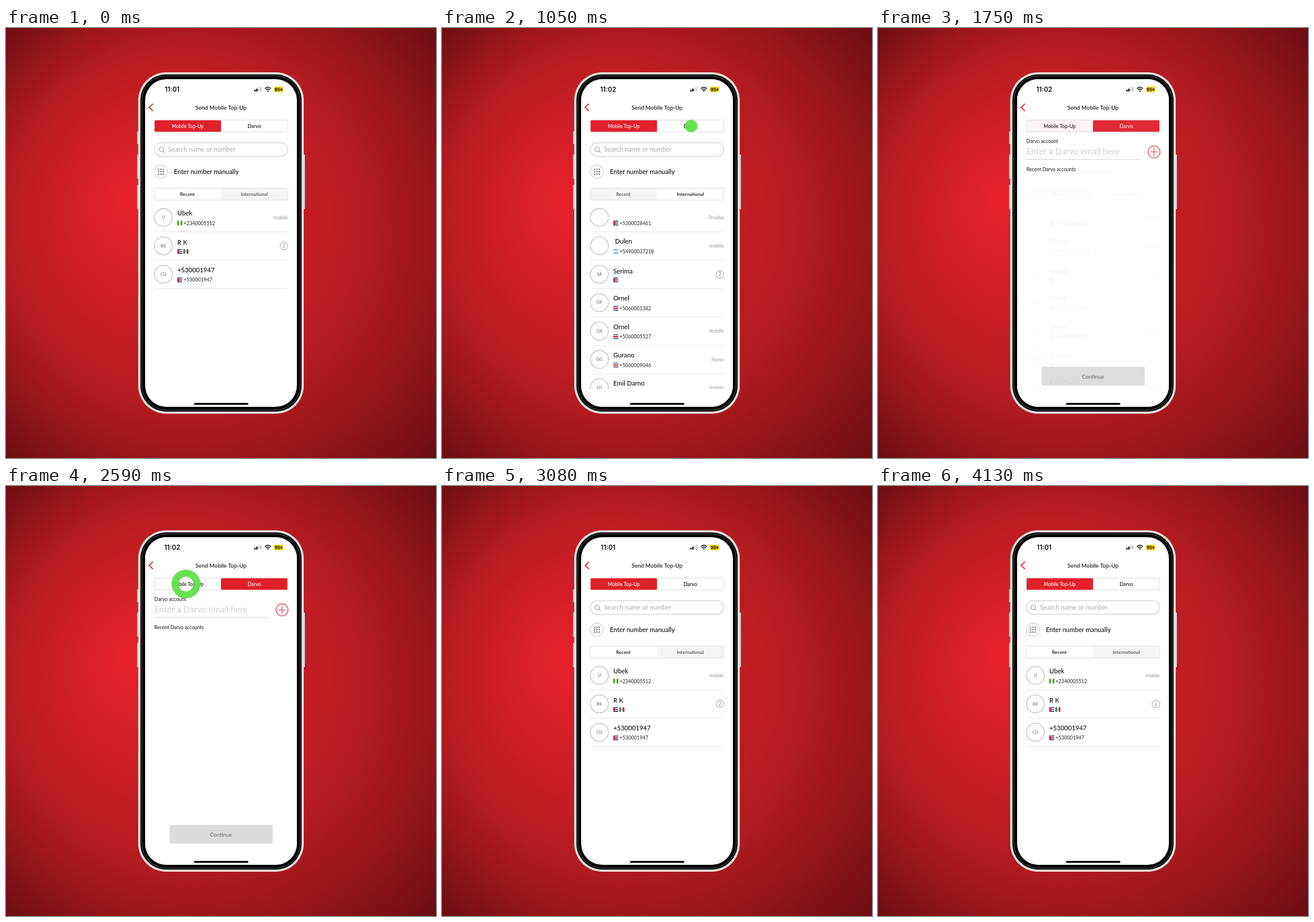
Animation, 748 px wide and 748 px high, one loop 4200 ms. Source, as an HTML page:

```html
<!DOCTYPE html>
<html lang="en">
<head>
<meta charset="utf-8">
<title>Mobile top-up</title>
<style>
html, body { margin: 0; width: 100%; height: 100%; overflow: hidden; background: #8f161c; }
svg { display: block; width: 100vw; height: 100vh; }
text { font-family: Lato, "Open Sans", sans-serif; }
.status { font-family: Inter, Roboto, sans-serif; }
</style>
</head>
<body>
<svg id="stage" viewBox="0 0 748 748"></svg>
<script>
const LOOP = 4200, RED = '#e0202a', GREEN = '#5fe04a', NAVY = '#1f2a6b';

// SVG helpers
const rect = (x, y, w, h, fill, r = 0, extra = '') =>
  `<rect x="${x}" y="${y}" width="${w}" height="${h}" rx="${r}" fill="${fill}" ${extra}/>`;
const box = (x, y, w, h, fill, r, line, width = 1) =>
  rect(x, y, w, h, fill, r, `stroke="${line}" stroke-width="${width}"`);
const ring = (x, y, r, line, width) =>
  `<circle cx="${x}" cy="${y}" r="${r}" fill="none" stroke="${line}" stroke-width="${width}"/>`;
const path = (d, line, width) =>
  `<path d="${d}" fill="none" stroke="${line}" stroke-width="${width}" stroke-linecap="round"/>`;
const label = (s, x, y, size, fill = '#111', anchor = 'start', weight = 400, cls = '') =>
  `<text x="${x}" y="${y}" font-size="${size}" fill="${fill}" text-anchor="${anchor}" font-weight="${weight}" class="${cls}">${s}</text>`;

const stripes = (colors, x, y, upright) => {
  const w = 8.6, h = 8, n = colors.length;
  return colors.map((c, i) => upright
    ? rect(x + i * w / n, y, w / n, h, c)
    : rect(x, y + i * h / n, w, h / n, c)).join('');
};
const flags = {
  ng: (x, y) => stripes(['#2f9e0c', '#fff', '#2f9e0c'], x, y, true),
  mx: (x, y) => stripes(['#14713f', '#fff', '#cf2030'], x, y, true) +
    `<circle cx="${x + 4.3}" cy="${y + 4}" r="1" fill="#8a6a3a"/>`,
  cu: (x, y) => stripes([NAVY, '#fff', NAVY, '#fff', NAVY], x, y) +
    `<path d="M${x} ${y}l5 4l-5 4z" fill="#d8202f"/>`,
  ar: (x, y) => stripes(['#7fbcd0', '#fff', '#7fbcd0'], x, y),
  cr: (x, y) => stripes([NAVY, '#fff', '#d8202f', '#d8202f', '#fff', NAVY], x, y)
};

function row(i, { initials = '', name = '', phone = '', codes, note = '', dx = 0 }) {
  const y = 329.6 + i * 49.4;
  const flagRow = codes.map((c, k) => flags[c](298 + k * 10.6, y + 5.8)).join('');
  const side = note === '2'
    ? ring(483.5, y, 6.6, '#999', 1) + label('2', 483.5, y + 3, 8.6, '#888', 'middle')
    : label(note, 490, y + 3, 8.5, '#999', 'end');
  return ring(273.8, y, 15.6, '#c2c2c2', 1.3) +
    label(initials, 273.8, y + 2.6, 7.2, '#888', 'middle', 700) +
    label(name, 298 + dx, y - (phone ? 3.6 : 1.8), 11.2, '#111', 'start', 500) +
    flagRow + label(phone, 308.8, y + 13, 8.6, '#222') + side +
    rect(258, y + 24.4, 232, 1, '#e8e8e8');
}

function topTabs(second) {
  return box(258, 160.2, 232, 20.6, '#fff', 2, '#ddd') +
    rect(second ? 374 : 258.5, 160.4, 115.5, 20.2, RED, 1.5) +
    label('Mobile Top-Up', 316, 173.6, 8.5, second ? '#111' : '#fff', 'middle', 500) +
    label('Darvo', 432, 173.6, 8.8, second ? '#fff' : '#111', 'middle', 500);
}

function clock(time, x) {
  return label(time, x, 110.8, 11.3, '#111', 'start', 600, 'status');
}

const screen = () => rect(242, 89, 264, 570, '#fff', 37);

function contactsScreen(second, rows) {
  let dots = '';
  for (let i = 0; i < 9; i++)
    dots += `<circle cx="${265.3 + i % 3 * 4.2}" cy="${245.8 + (i / 3 | 0) * 4.2}" r="1.4" fill="#888"/>`;
  return screen() + clock(second ? '11:02' : '11:01', second ? 275.3 : 276.3) +
    topTabs(false) +
    box(258, 199.6, 232, 23.6, '#fff', 11.8, '#d0d0d0', 1.2) +
    ring(270, 211, 4, '#999', 1.1) + path('M273 214l2.6 2.6', '#999', 1.1) +
    label('Search name or number', 282, 215.3, 11.3, '#aaa') +
    ring(269.5, 250, 11.4, '#ccc', 1.1) + dots +
    label('Enter number manually', 292, 254, 11.1, '#111', 'start', 500) +
    box(258, 278.6, 232, 20.8, '#fff', 2, '#ddd') +
    rect(second ? 258.5 : 374, 279, 115.5, 20, '#f4f4f4') +
    label('Recent', 315.5, 291.9, 8.3, second ? '#333' : '#111', 'middle', second ? 400 : 600) +
    label('International', 432, 291.9, 8.3, second ? '#111' : '#333', 'middle', second ? 600 : 400) +
    `<g clip-path="url(#list)">${rows.map((r, i) => row(i, r)).join('')}</g>`;
}

function accountScreen() {
  return screen() + clock('11:02', 275.3) + topTabs(true) +
    label('Darvo account', 258, 200.4, 8.7) +
    label('Enter a Darvo email here', 258, 220.2, 15, '#d0d0d0') +
    rect(258, 228, 198, 1, '#d4d4d4') +
    ring(480.2, 215.5, 10.4, '#d33a44', 1.2) +
    path('M474 215.5h12.4M480.2 209.3v12.4', '#d33a44', 1.2) +
    label('Recent Darvo accounts', 258, 248.6, 8.5) +
    rect(284.5, 589.5, 179.5, 32.5, '#dcdcdc', 2) +
    label('Continue', 374, 609.6, 9.6, '#666', 'middle');
}

const recent = [
  { initials: 'U', name: 'Ubek', phone: '+2340005512', codes: ['ng'], note: 'mobile' },
  { initials: 'RK', name: 'R K', codes: ['cu', 'mx'], note: '2' },
  { initials: 'CU', name: '+530001947', phone: '+530001947', codes: ['cu'] }
];
const international = [
  { phone: '+5300028461', codes: ['cu'], note: 'Prueba' },
  { name: 'Dulen', phone: '+54900037218', codes: ['ar'], note: 'mobile', dx: 3 },
  { initials: 'SA', name: 'Serima', codes: ['cu'], note: '2' },
  { initials: 'OP', name: 'Ornel', phone: '+5060001382', codes: ['cr'] },
  { initials: 'OX', name: 'Ornel', phone: '+5060005527', codes: ['cr'], note: 'mobile' },
  { initials: 'GG', name: 'Gurano', phone: '+5060009046', codes: ['cr'], note: 'home' },
  { initials: 'ED', name: 'Emil Darno', phone: '+5060003319', codes: ['cr'], note: 'mobile' }
];

const buttons = [[228, 180, 22], [228, 220, 42], [228, 273, 42], [517, 220, 95]]
  .map(([x, y, h]) => rect(x, y, 3, h, '#d5d0cd', 1)).join('');

const phone = buttons +
  rect(230, 77, 288, 594, '#e2dfdc', 49) +
  rect(233.8, 80.8, 280.4, 586.4, '#050505', 45.2) +
  box(236.4, 83.4, 275.2, 581.2, '#000', 42.6, '#56585a', 1);

const statusBar =
  [3, 5, 7, 8.4].map((h, i) => rect(431.8 + i * 3.4, 110.6 - h, 2.5, h, i < 2 ? '#111' : '#ccc', .6)).join('') +
  path('M450.6 105.2q4.9-4.4 9.8 0M452.4 107.4q3.1-2.7 6.2 0', '#111', 1.5) +
  '<path d="M453.7 109q1.8-1.5 3.6 0l-1.8 2z" fill="#111"/>' +
  rect(466, 102, 16.6, 9.8, '#f8d516', 3) +
  label('95', 467.2, 109.8, 7.8, '#111', 'start', 700, 'status') +
  '<path d="M479.8 103.6l-3 3.8h2l-.6 2.9l3.1-3.9h-2z" fill="#111"/>' +
  path('M255 132.3l-6 5.8l6 5.8', '#d8232e', 1.8) +
  label('Send Mobile Top-Up', 374, 142, 9.9, '#111', 'middle', 500) +
  rect(327, 652.3, 94.5, 3.2, '#000', 1.6);

const stage = document.getElementById('stage');
stage.innerHTML = `<defs>
  <radialGradient id="bg" gradientUnits="userSpaceOnUse" cx="374" cy="374" r="530" fx="215" fy="295">
    <stop offset="0" stop-color="#e6212a"/><stop offset=".3" stop-color="#d01f26"/>
    <stop offset=".6" stop-color="#b31b21"/><stop offset=".8" stop-color="#911519"/>
    <stop offset="1" stop-color="#6a0d14"/>
  </radialGradient>
  <clipPath id="list"><rect x="242" y="305" width="264" height="323"/></clipPath>
</defs>` + rect(0, 0, 748, 748, 'url(#bg)') + phone +
  `<g>${contactsScreen(false, recent)}</g>
  <g id="abroad">${contactsScreen(true, international)}</g>
  <g id="account">${accountScreen()}</g>` + statusBar +
  `<circle id="tap" fill="none" stroke="${GREEN}"/>`;

const [abroad, account, tap] = ['abroad', 'account', 'tap'].map(id => document.getElementById(id));
const taps = [[70, 433.5, 288.5], [1050, 433.5, 170.5], [2310, 313, 170.5]];

const clamp = v => Math.min(1, Math.max(0, v));
const fade = (t, start) => {
  const p = clamp((t - start) / 520);
  return p * p * (3 - 2 * p);
};

function show(el, opacity) {
  el.setAttribute('opacity', opacity);
  el.style.display = opacity > 0 ? '' : 'none';
}

// The dot grows, then its hole grows until only a thin ring is left.
function drawTap(t) {
  const hit = taps.find(([start]) => t >= start && t < start + 560);
  if (!hit) return show(tap, 0);
  const age = t - hit[0];
  const outer = 25 * (1 - (1 - clamp((age + 70) / 280)) ** 2) - 1.3 * clamp((age - 280) / 140);
  const inner = 23.6 * (1 - (1 - clamp((age - 140) / 350)) ** 1.5);
  const width = Math.max(.7, outer - inner);
  const attrs = { cx: hit[1], cy: hit[2], r: outer - width / 2, 'stroke-width': width };
  for (const k in attrs) tap.setAttribute(k, attrs[k]);
  show(tap, .94 * clamp((540 - age) / 120));
}

function frame(now) {
  const t = now % LOOP;
  show(abroad, t < 2000 ? fade(t, 290) : 0);
  show(account, fade(t, 1300) * (1 - fade(t, 2570)));
  drawTap(t);
  requestAnimationFrame(frame);
}
frame(performance.now());
</script>
</body>
</html>
```
